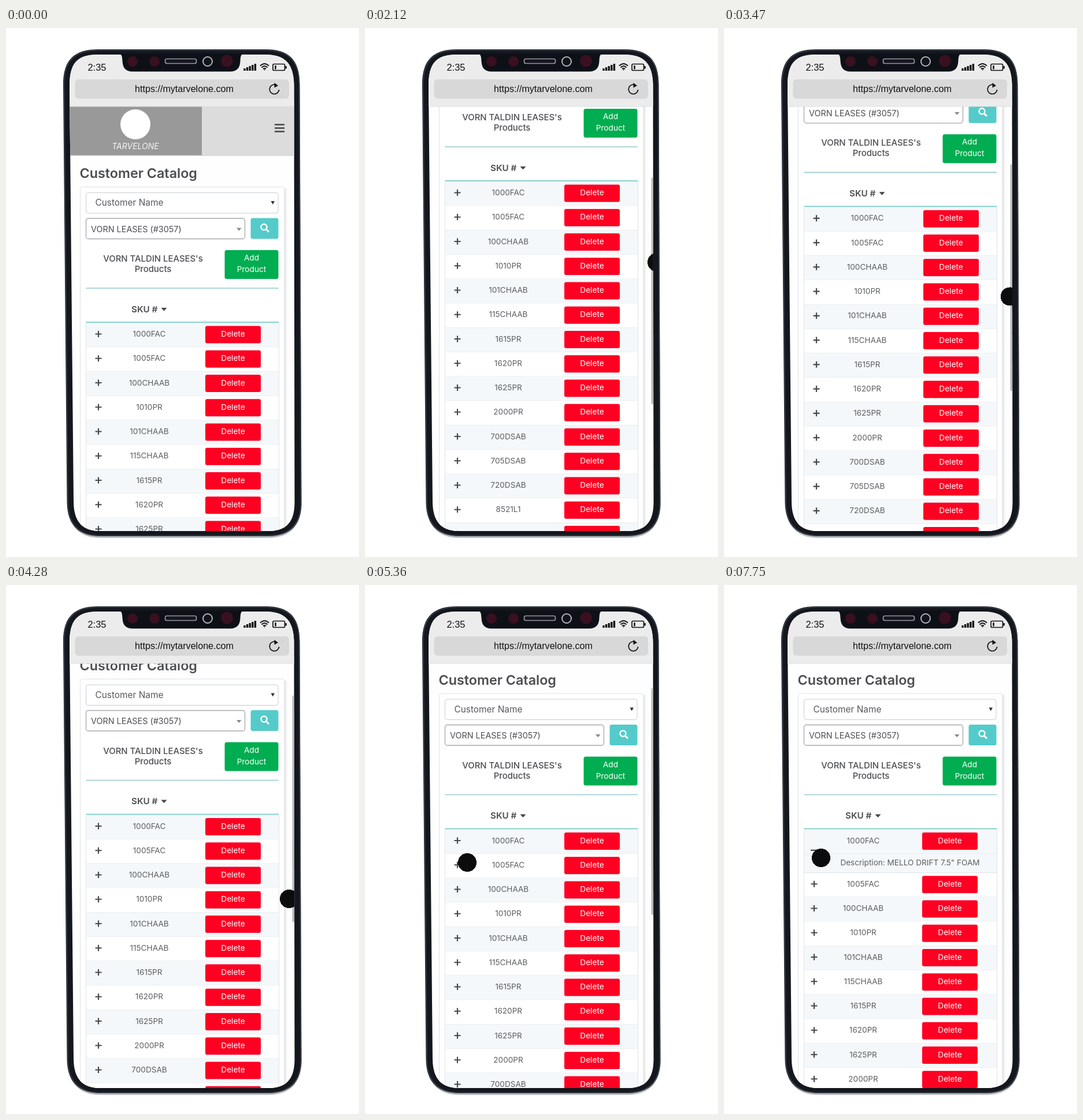
These frames come from a looping animation (611 px wide and 917 px high, 8 s). An HTML page:

```html
<!DOCTYPE html>
<html lang="en">
<head>
<meta charset="utf-8">
<title>Customer catalog on a phone</title>
<style>
  html, body { margin: 0; width: 100%; height: 100%; overflow: hidden; background: #fff; }
  svg { display: block; width: 100vw; height: 100vh; }
  text { font-family: Inter, "Open Sans", sans-serif; fill: #4b4d50; }
  .mid { text-anchor: middle; }
  .sys { font-family: "Liberation Sans", Arial, sans-serif; fill: #111; }
  .cell { font-size: 13.6px; fill: #5c5e61; }
  .btn { font-size: 13.7px; fill: #fff; }
</style>
</head>
<body>
<svg viewBox="0 0 611 917" xmlns="http://www.w3.org/2000/svg">
  <defs>
    <path id="glass" d="M110 100C110 62 122 46 160 46H447C484 46 498 62 498.500 100L499.500 822C499.500 856 486 872 453 872H164C132 872 117.500 856 117 822Z"/>
    <clipPath id="screen"><use href="#glass"/></clipPath>
    <clipPath id="view"><rect x="100" y="136" width="410" height="745"/></clipPath>
    <linearGradient id="shade" x1="0" x2="1">
      <stop offset="0" stop-color="#dcdcdc"/>
      <stop offset="1" stop-color="#fff" stop-opacity="0"/>
    </linearGradient>
  </defs>

  <path d="M107 824C108 864 126 884 164 884H453C492 884 511 864 512 824Z" fill="#b9bbbd"/>
  <path d="M99 98C99 54 119 37 160 37H446C489 36 508 54 508.500 97L511.500 822C511.500 862 492 881 453 881H164C126 881 106 862 105.500 822Z" fill="#14171d"/>
  <path d="M100.500 98C100.500 55 120 38.500 160 38.500H446C488 37.500 507 55 507.500 97L510.500 822C510.500 861 491 880 453 880H164C127 880 107.500 861 107 822Z" fill="none" stroke="#39404c" stroke-width="1.500"/>
  <use href="#glass" fill="#fefefe"/>

  <g clip-path="url(#screen)">
    <g clip-path="url(#view)">
      <g id="page">
        <rect x="110" y="136" width="390" height="85" fill="#dcdcdc"/>
        <rect x="110" y="136" width="229" height="85" fill="#999"/>
        <path d="M110 221H500" stroke="#c9ccd2"/>
        <circle cx="224" cy="167" r="26" fill="#fff"/>
        <text class="mid" x="224" y="210" font-size="14" font-style="italic" style="fill:#f4f4f4">TARVELONE</text>
        <path d="M465 167.500H482M465 173.500H482M465 179.500H482" stroke="#444" stroke-width="2.300"/>

        <text x="127.500" y="260" font-size="23.300" font-weight="600">Customer Catalog</text>
        <rect x="482" y="278" width="7" height="1000" fill="url(#shade)"/>
        <rect x="128.500" y="275.500" width="353.500" height="1000" rx="4" fill="#fff" stroke="#dfe1e3"/>

        <rect x="138.500" y="285.500" width="332.500" height="35.500" rx="4" fill="#fff" stroke="#c8ced4"/>
        <text x="154.500" y="308" font-size="15.400" style="fill:#55585c">Customer Name</text>
        <path d="M458.500 300H465L461.750 306Z" fill="#333"/>

        <rect x="138.500" y="330" width="275" height="35.500" rx="4" fill="#fff" stroke="#a6a8aa" stroke-width="1.300"/>
        <text x="147" y="353.500" font-size="14.400">VORN LEASES (#3057)</text>
        <path d="M399 346.500H407.500L403.250 351.500Z" fill="#888"/>
        <rect x="423.500" y="329.500" width="48" height="36" rx="3.500" fill="#54cbca"/>
        <g fill="none" stroke="#fff" stroke-width="2.500">
          <circle cx="446.500" cy="345" r="5"/>
          <path d="M450 348.500L455 353.500" stroke-width="3"/>
        </g>

        <g class="mid" font-size="14.900" font-weight="500">
          <text x="254.500" y="405">VORN TALDIN LEASES's</text>
          <text x="254.500" y="423">Products</text>
        </g>
        <rect x="378.500" y="385" width="93" height="50" rx="3.500" fill="#00ad50"/>
        <g class="mid" font-size="13.500">
          <text class="btn" x="425" y="403">Add</text>
          <text class="btn" x="425" y="423">Product</text>
        </g>
        <path d="M138.500 451H472" stroke="#98c9ce" stroke-width="1.600"/>

        <g id="head">
          <text x="217" y="492.500" font-size="15.200" font-weight="600">SKU #</text>
          <path d="M268.500 485H278.500L273.500 490.500Z" fill="#44464a"/>
        </g>
        <g id="rows"></g>
        <path d="M138.500 510H472.500" stroke="#86d2cd" stroke-width="2"/>
      </g>
    </g>

    <rect id="thumb" x="495.500" width="4" height="393" rx="2" fill="#b9b9b9"/>
    <circle id="dot" r="16" fill="#0b0c0d" shape-rendering="crispEdges"/>

    <rect x="105" y="40" width="400" height="96" fill="#ececec"/>
    <path d="M105 136H505" stroke="#dedede"/>
    <rect x="119.500" y="89" width="370.500" height="33.500" rx="6" fill="#d8d8d8"/>
    <text class="sys" x="141.500" y="74" font-size="16.400">2:35</text>
    <text class="sys mid" x="308.500" y="111" font-size="16.100">https://mytarvelone.com</text>
    <g fill="none" stroke="#111" stroke-width="1.700">
      <path d="M469.500 99.800A8.200 8.200 0 1 0 472.600 107"/>
      <path d="M464.500 95L471 100L464.500 103.500Z" fill="#111" stroke="none"/>
      <rect x="462" y="62.500" width="20.500" height="11" rx="2"/>
      <path d="M484.500 66V70.500M466.500 65V71.500" stroke-width="2.500"/>
      <path d="M440 65.500Q447.500 58.500 455 65.500M442.500 68.500Q447.500 63.500 452.500 68.500M445 71Q447.500 69 450 71" stroke-width="2"/>
      <circle cx="447.500" cy="72.500" r="1" fill="#111" stroke="none"/>
    </g>
    <path d="M413 74V70M417.600 74V68M422.200 74V66M426.800 74V64M431.400 74V62" stroke="#111" stroke-width="3.400"/>
  </g>

  <path d="M194 44.500C201 44.500 201 50 201.500 57C202 69 207 75.500 219 75.500H388C400 75.500 405 69 405.500 57C406 50 406 44.500 413 44.500Z" fill="#0e1017"/>
  <g fill="#39101f">
    <circle cx="219" cy="58" r="9"/>
    <circle cx="257" cy="58" r="9"/>
    <circle cx="382.500" cy="57" r="10.500"/>
  </g>
  <rect x="275.500" y="53.500" width="54" height="8" rx="3" fill="#15161f" stroke="#96979f" stroke-width="1.700"/>
  <circle cx="349" cy="58" r="8" fill="#11131a" stroke="#b5b6bc" stroke-width="2"/>
</svg>
<script>
const LOOP = 8000, STEP = 270, PITCH = 42.25, TOP = 511, EXTRA = 33;
const OPEN_AT = 6170, RESUME_AT = 6670;
const SKUS = ("1000FAC 1005FAC 100CHAAB 1010PR 101CHAAB 115CHAAB 1615PR 1620PR " +
  "1625PR 2000PR 700DSAB 705DSAB 720DSAB 8521L1 8526L1").split(" ");

// time, value(s)
const SCROLL = [[500, 0], [770, 8], [1040, 40], [1310, 84.5], [1850, 205], [2120, 245],
  [2390, 250], [2930, 249.5], [3200, 233], [4010, 136], [4280, 112.5], [4550, 95], [4820, 85], [5090, 87.5]];
const FINGER = [[500, 508, 651], [1310, 504, 566], [1850, 504, 446], [2120, 505, 406], [2390, 503, 402],
  [2930, 498, 413], [4280, 490, 544], [4550, 486, 561], [4820, 415, 557], [5360, 177, 481],
  [5900, 160, 455], [6670, 157, 453], [6940, 172, 453], [7210, 187, 464], [7480, 181, 481], [7750, 168, 473]];

const el = id => document.getElementById(id);
const [page, head, rows, thumb, dot] = ["page", "head", "rows", "thumb", "dot"].map(el);
const move = (node, x, y) => node.setAttribute("transform", `translate(${x} ${y})`);
const show = (node, on) => node.setAttribute("visibility", on ? "visible" : "hidden");

function group(html) {
  const g = document.createElementNS("http://www.w3.org/2000/svg", "g");
  g.innerHTML = html;
  rows.append(g);
  return g;
}

const band = (h, fill) => `<rect x="138.500" width="334" height="${h}" fill="${fill}"/>
  <path d="M138.500 0V${h}H472.500V0" fill="none" stroke="#dfe3e7"/>`;

const items = SKUS.map((sku, i) => {
  const g = group(`${band(PITCH, i % 2 ? "#fff" : "#f5f8fa")}
    <path class="plus" d="M154.500 19.500H165.500M160 14V25" stroke="#47494c" stroke-width="2.200"/>
    <text class="cell mid sku" x="248" y="24">${sku}</text>
    <g class="delete"><rect x="345" y="5.500" width="96" height="30" rx="3" fill="#fd0022"/>
    <text class="btn mid" x="393" y="24">Delete</text></g>`);
  const [plus, label, button] = [".plus", ".sku", ".delete"].map(s => g.querySelector(s));
  return { g, plus, label, button };
});

const detail = group(`${band(EXTRA, "#f5f8fa")}
  <path d="M150 -6H162" stroke="#33353a" stroke-width="2"/>
  <text class="cell mid" x="322" y="20">Description: MELLO DRIFT 7.5" FOAM</text>`);
move(detail, 0, TOP + PITCH);

function sample(keys, t) {
  const n = keys.findIndex(k => k[0] > t);
  if (n < 0) return keys[keys.length - 1].slice(1);
  if (n === 0) return keys[0].slice(1);
  const a = keys[n - 1], b = keys[n], p = (t - a[0]) / (b[0] - a[0]);
  return a.slice(1).map((v, i) => v + (b[i + 1] - v) * p);
}

function quantise(t) {
  if (t < 500) return 0;
  if (t >= OPEN_AT && t < RESUME_AT) return OPEN_AT;
  const from = t < OPEN_AT ? 500 : RESUME_AT;
  return from + Math.floor((t - from) / STEP) * STEP;
}

function draw(time) {
  const t = quantise(time), open = t >= OPEN_AT;
  const [scroll] = sample(SCROLL, t);
  const [x, y] = sample(FINGER, t);
  move(page, 0, -scroll);
  move(head, open ? -7 : 0, 0);
  items.forEach(({ g, plus, label, button }, i) => {
    move(g, 0, TOP + i * PITCH + (open && i ? EXTRA : 0));
    move(plus, open ? -4 : 0, 0);
    move(label, open ? -7 : 0, 0);
    move(button, open ? -2 : 0, 0);
  });
  show(items[0].plus, !open);
  show(detail, open);
  thumb.setAttribute("y", 134 + scroll * 0.51);
  show(thumb, t >= 500 && t < 5900);
  move(dot, x, y);
  show(dot, t >= 500);
}

const start = performance.now();
function tick() {
  draw((performance.now() - start) % LOOP);
  requestAnimationFrame(tick);
}
tick();
</script>
</body>
</html>
```
